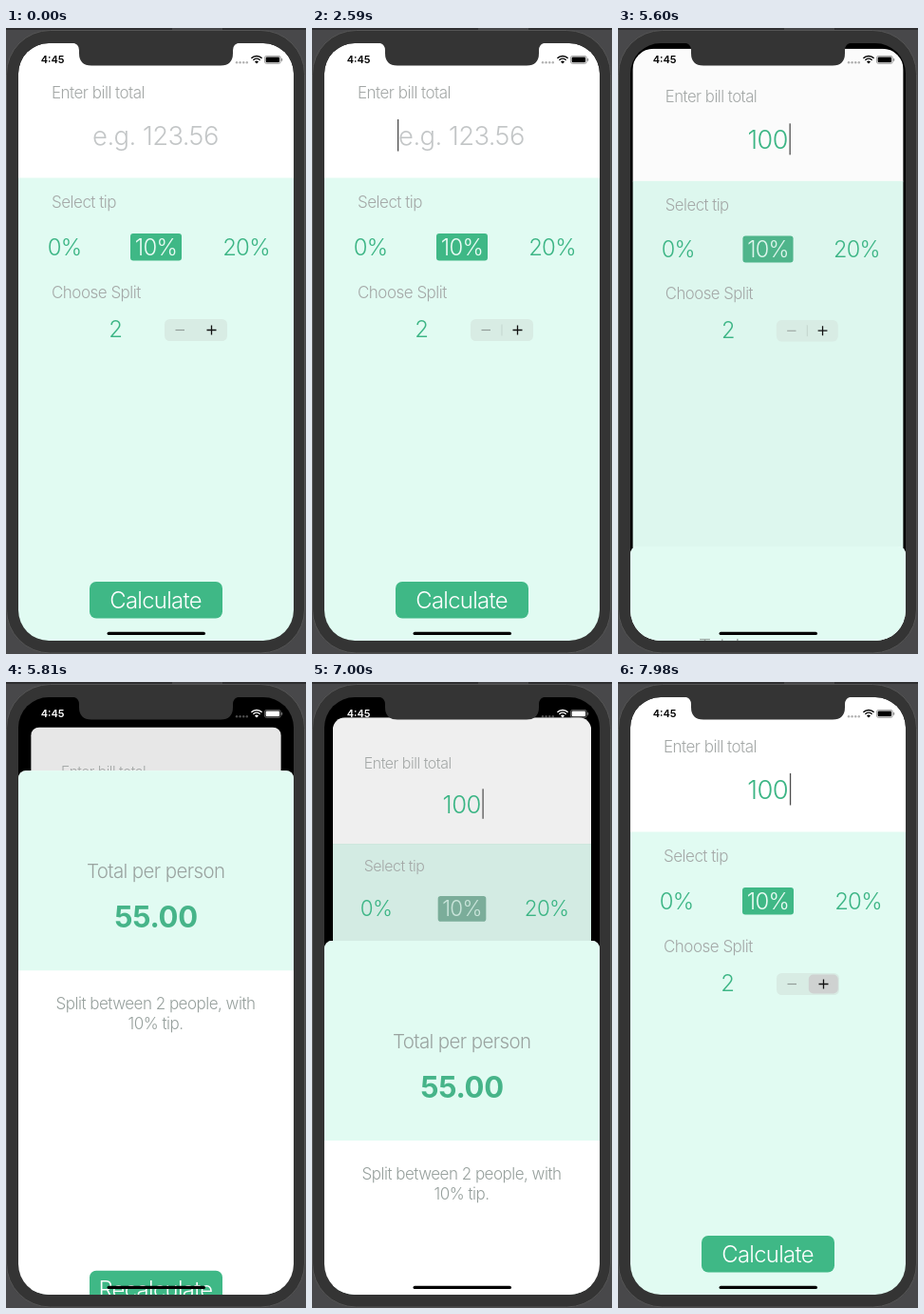
An HTML page for the animation above (8 s loop, 316 by 658 pixels).

```html
<!DOCTYPE html>
<html lang="en">
<head>
<meta charset="utf-8">
<title>Tip calculator</title>
<style>
html, body { margin: 0; width: 100%; height: 100%; overflow: hidden; background: #48484a; }
svg { display: block; width: 100%; height: 100%; }
text {
  font-family: Inter, "Open Sans", sans-serif;
  font-weight: 300;
  font-optical-sizing: none;
  letter-spacing: -.03em;
}
.label { font-size: 17px; fill: #a4a8a7; }
.big { font-size: 27.4px; letter-spacing: -.02em; }
.mid { font-size: 23.9px; }
.green { fill: #3cb585; }
.center { text-anchor: middle; }
</style>
</head>
<body>
<svg viewBox="0 0 316 658">
  <defs>
    <clipPath id="screen"><rect x="13" y="16" width="290" height="628" rx="32"/></clipPath>
    <clipPath id="cardClip"><rect id="cardShape" x="13" y="16" width="290" height="700"/></clipPath>
  </defs>

  <!-- phone body -->
  <rect width="316" height="2" fill="#2e2e30"/>
  <rect x="175" width="53" height="2" fill="#454547"/>
  <rect x=".5" y="2.5" width="314" height="654.5" rx="46" fill="#343434" stroke="#555"/>

  <g clip-path="url(#screen)">
    <rect x="13" y="16" width="290" height="628"/>

    <g id="card"><g clip-path="url(#cardClip)">
      <rect x="13" y="16" width="290" height="142" fill="#fff"/>
      <rect x="13" y="157.5" width="290" height="560" fill="#e1fbf2"/>
      <rect id="dim" x="13" y="16" width="290" height="700"/>

      <text class="label" x="48" y="73.7">Enter bill total</text>
      <text id="hint" class="big center" x="157.5" y="123" fill="#c3c6c7">e.g. 123.56</text>
      <text id="amount" class="big center green" x="157.7" y="123"></text>
      <rect id="caret" y="96" width="1.3" height="33.5" fill="#4c4c4c"/>

      <text class="label" x="48" y="188.7">Select tip</text>
      <text class="mid center green" x="61.7" y="238.7">0%</text>
      <rect id="tip" x="131" y="216" width="54" height="28.5" rx="3"/>
      <text id="tipText" class="mid center" x="158" y="238.7" fill="#e9fbf4">10%</text>
      <text class="mid center green" x="253" y="238.7">20%</text>

      <text class="label" x="48" y="283.9">Choose Split</text>
      <text class="mid center green" x="115.2" y="325.2">2</text>
      <rect x="167" y="306" width="66" height="23" rx="5.5" fill="#d8ece4"/>
      <rect id="plusDown" x="200.8" y="307.6" width="31" height="19.8" rx="5" fill="#cfd2d1"/>
      <path id="divider" d="M200 311.5v12" stroke="#c3d5ce"/>
      <path d="M178.5 317.5h9.5" stroke="#939d99" stroke-width="1.2"/>
      <path d="M211.5 317.5h10M216.5 312.5v10" stroke="#111" stroke-width="1.3"/>

      <rect x="88" y="582" width="140" height="38.5" rx="7" fill="#3fb886"/>
      <text id="calc" class="mid center" x="157.5" y="610" fill="#fff">Calculate</text>
    </g></g>

    <g id="modal">
      <path d="M13 720V66a8 8 0 0 1 8-8h274a8 8 0 0 1 8 8v654z" fill="#fff"/>
      <path d="M13 268V66a8 8 0 0 1 8-8h274a8 8 0 0 1 8 8v202z" fill="#e1fbf2"/>
      <text class="center" x="157.7" y="170.6" font-size="20.5" fill="#9aa3a0">Total per person</text>
      <text class="center" x="158" y="222.5" style="font-size:31px;font-weight:700;letter-spacing:-.01em" fill="#46b489">55.00</text>
      <g class="label center" style="fill:#97a09d">
        <text x="157.5" y="308.8">Split between 2 people, with</text>
        <text x="157.5" y="329.8">10% tip.</text>
      </g>
      <rect x="88" y="583.5" width="140" height="38.5" rx="7" fill="#3fb886"/>
      <text id="recalc" class="mid center" x="157.5" y="611.7" fill="#fff">Recalculate</text>
    </g>

    <!-- status bar -->
    <g id="status">
      <text x="36.7" y="37.4" style="font-size:11px;font-weight:600;letter-spacing:0">4:45</text>
      <g opacity=".3">
        <circle cx="243" cy="36.2" r="1.2"/><circle cx="246.6" cy="36.2" r="1.2"/>
        <circle cx="250.2" cy="36.2" r="1.2"/><circle cx="253.8" cy="36.2" r="1.2"/>
      </g>
      <path d="M264 37.6l-2-2.2a3 3 0 0 1 4 0z"/>
      <g id="waves" fill="none" stroke-width="1.5">
        <path d="M260.4 33.8a5.2 5.2 0 0 1 7.2 0"/>
        <path d="M258.4 31.7a8 8 0 0 1 11.2 0"/>
        <rect x="272.4" y="29.4" width="17" height="8" rx="2.2" stroke-width=".8" opacity=".45"/>
      </g>
      <rect x="273.6" y="30.6" width="14.6" height="5.6" rx="1.2"/>
      <rect x="290.2" y="32" width="1" height="2.8" rx=".5" opacity=".5"/>
    </g>
    <rect x="106.5" y="634.7" width="103.5" height="3.4" rx="1.7"/>
  </g>

  <path d="M69 15.5q8 .5 8 8v3q0 13 13 13h136q13 0 13-13v-3q0-7.5 8-8z" fill="#343434"/>
</svg>

<script>
const LOOP = 8000;
const el = id => document.getElementById(id);
const set = (id, attrs) => {
  for (const k in attrs) el(id).setAttribute(k, attrs[k]);
};
const clamp = v => Math.max(0, Math.min(1, v));
const ramp = (t, start, length) => clamp((t - start) / length);
const mix = (a, b, k) => `rgb(${a.map((v, i) => Math.round(v + (b[i] - v) * k))})`;

// critically damped spring, 0 to 1
const spring = ms => {
  const x = Math.max(0, ms) * 0.018;
  return 1 - (1 + x) * Math.exp(-x);
};

// caret fades: [start, direction]
const blinks = [
  [2050, 0], [2410, 1], [3160, 0], [3450, 1],
  [4575, 0], [4930, 1], [7365, 0], [7720, 1]
];

function caretAlpha(t) {
  if (t < 1540) return 0;
  let alpha = 1;
  for (const [start, on] of blinks) {
    if (t < start) break;
    const k = ramp(t, start, on ? 180 : 90);
    alpha = on ? k : 1 - k;
  }
  return alpha;
}

function sheet(t) {
  if (t < 6930) return spring(t - 5560);
  return t < 7280 ? 1 - spring(t - 6930) : 0;
}

// button title dims while held
const held = (t, down, up) => 1 - 0.7 * (ramp(t, down, 60) - ramp(t, up, 150));

function draw(t) {
  const p = sheet(t);
  const scale = 1 - 0.097 * p;
  const radius = 32 - 23 * Math.sqrt(p);
  set('card', { transform: `translate(158 ${16 + 33.5 * p}) scale(${scale}) translate(-158 -16)` });
  set('cardShape', { rx: radius });
  set('dim', { opacity: 0.1 * p });
  set('modal', { transform: `translate(0 ${586 * (1 - p)})`, visibility: p > 0 ? 'visible' : 'hidden' });

  const typed = t < 3780 ? 0 : t < 3920 ? 1 : t < 4060 ? 2 : 3;
  el('amount').textContent = '100'.slice(0, typed);
  set('hint', { visibility: typed ? 'hidden' : 'visible' });
  set('caret', { x: typed ? 157.5 + typed * 7.8 : 90, opacity: caretAlpha(t) });

  set('tip', { fill: mix([63, 184, 134], [142, 170, 160], clamp(p * 1.2)) });
  set('tipText', { opacity: 1 - 0.45 * p });
  set('divider', { opacity: ramp(t, 70, 300) * (t < 7940 ? 1 : 0) });
  set('plusDown', { opacity: t < 7940 ? 0 : 1 });
  set('calc', { opacity: held(t, 5370, 5500) });
  set('recalc', { opacity: held(t, 6630, 6800) });

  const ink = mix([0, 0, 0], [255, 255, 255], ramp(p, 0.2, 0.3));
  set('status', { fill: ink });
  set('waves', { stroke: ink });
}

const begin = performance.now();
function tick() {
  draw((performance.now() - begin) % LOOP);
  requestAnimationFrame(tick);
}
draw(0);
requestAnimationFrame(tick);
</script>
</body>
</html>
```
